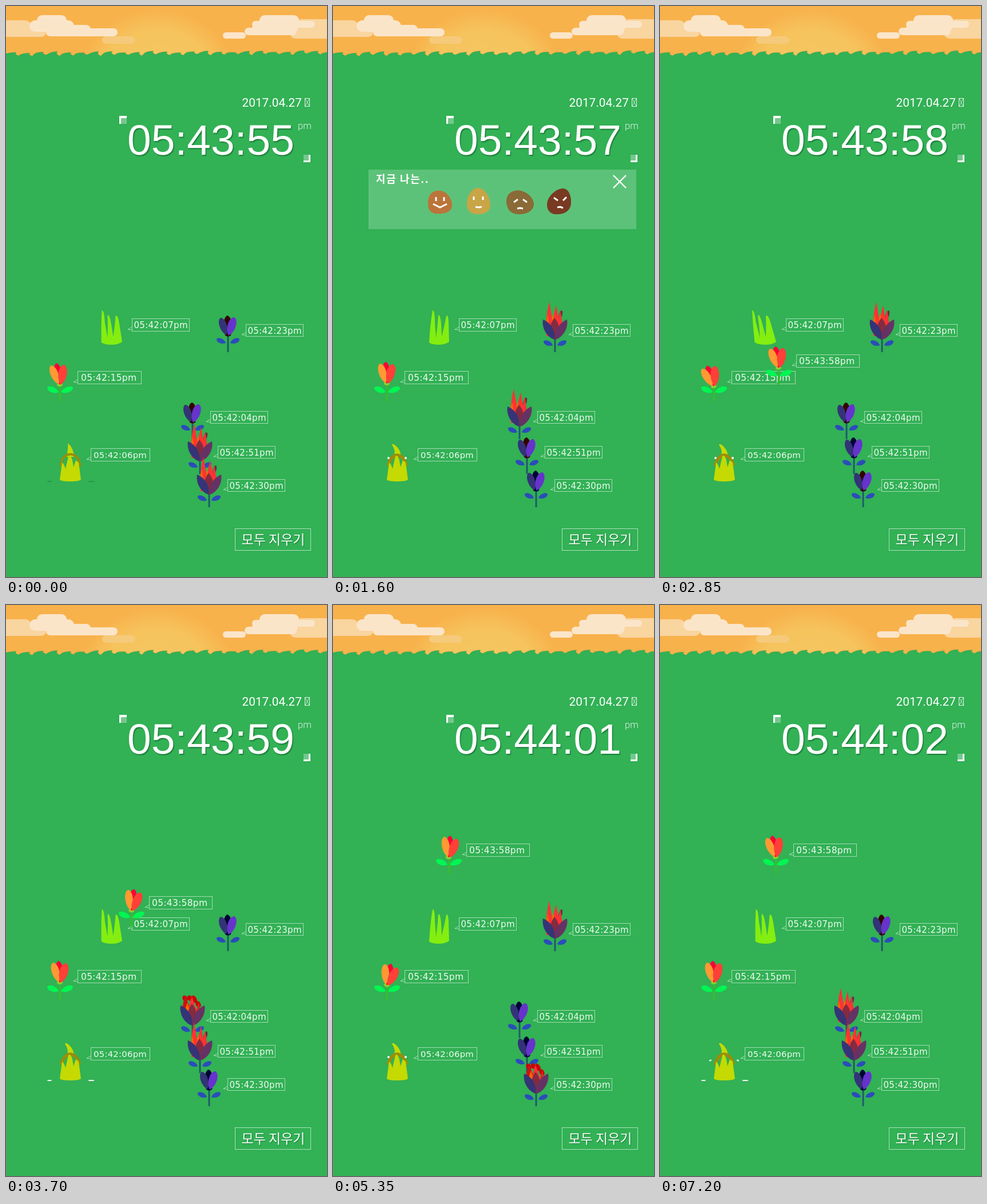
Animation of 561 by 998 pixels, one loop 7.25 s. Source, as an HTML page with a canvas:

```html
<!DOCTYPE html>
<html lang="ko">
<head>
<meta charset="utf-8">
<title>Garden clock</title>
<style>
html, body { margin: 0; width: 100%; height: 100%; overflow: hidden; background: #32b155; }
canvas { display: block; width: 561px; height: 998px; }
</style>
</head>
<body>
<canvas id="stage" width="561" height="998"></canvas>
<script>
const W = 561, H = 998, LOOP = 7250;
const c = document.getElementById('stage').getContext('2d');
const GREEN = '#32b155';
const KR = '"Noto Sans CJK KR", "Noto Sans CJK", sans-serif';

const mod = (a, b) => ((a % b) + b) % b;

// Interpolates rows of [time, value, ...]
function track(keys, t) {
  let i = 0;
  while (i < keys.length - 2 && t >= keys[i + 1][0]) i++;
  const a = keys[i], b = keys[i + 1];
  const k = Math.min(1, Math.max(0, (t - a[0]) / (b[0] - a[0])));
  return a.slice(1).map((v, j) => v + (b[j + 1] - v) * k);
}

function at(x, y, draw) {
  c.save();
  c.translate(x, y);
  draw();
  c.restore();
}

function oval(color, x, y, rx, ry, turn = 0) {
  c.fillStyle = color;
  c.beginPath();
  c.ellipse(x, y, rx, ry, turn, 0, 7);
  c.fill();
}

function pill(color, x, y, w, h) {
  c.fillStyle = color;
  c.beginPath();
  c.roundRect(x, y, w, h, h / 2);
  c.fill();
}

function shape(color, path) {
  c.fillStyle = color;
  c.fill(new Path2D(path));
}

function line(color, width, ...p) {
  c.strokeStyle = color;
  c.lineWidth = width;
  c.beginPath();
  for (let i = 0; i < p.length; i += 2) c.lineTo(p[i], p[i + 1]);
  c.stroke();
}

// Petal from (x, y) to the tip (u, v); a larger full gives a rounder tip
function petal(color, x, y, u, v, w, full = .92) {
  const dx = u - x, dy = v - y, d = Math.hypot(dx, dy);
  const nx = -dy / d * w, ny = dx / d * w;
  c.fillStyle = color;
  c.beginPath();
  c.moveTo(x, y);
  c.bezierCurveTo(x + dx * .25 + nx, y + dy * .25 + ny, x + dx * full + nx, y + dy * full + ny, u, v);
  c.bezierCurveTo(x + dx * full - nx, y + dy * full - ny, x + dx * .25 - nx, y + dy * .25 - ny, x, y);
  c.fill();
}

// Pointed blade with a slight bend
function blade(color, x, y, u, v, w) {
  c.fillStyle = color;
  c.beginPath();
  c.moveTo(x - w, y);
  c.quadraticCurveTo(u - w, (y + v) / 2, u, v);
  c.quadraticCurveTo(u + w * .6, (y + v) / 2, x + w, y);
  c.fill();
}

function text(str, x, y, font, o = {}) {
  c.save();
  c.font = font;
  c.fillStyle = o.color || '#fff';
  c.textAlign = o.align || 'left';
  c.letterSpacing = (o.gap || 0) + 'px';
  if (o.shadow) {
    c.shadowColor = 'rgba(0,60,20,.45)';
    c.shadowOffsetX = c.shadowOffsetY = o.shadow;
    c.shadowBlur = 1.5;
  }
  c.fillText(str, x, y);
  c.restore();
}

function label(str, x, y, w, h, size, inset) {
  const edge = 'rgba(255,255,255,.55)';
  c.strokeStyle = edge;
  c.lineWidth = 1;
  c.strokeRect(x + .5, y + .5, w - 1, h - 1);
  line(edge, 1, x, y + h * .66, x - 7, y + h * .84, x, y + h * .88);
  text(str, x + inset, y + h / 2 + 5.5, size + 'px "DejaVu Sans", sans-serif',
    { gap: .28, color: '#effaf2' });
}

function sky() {
  c.fillStyle = '#f8b24c';
  c.fillRect(0, 0, W, 92);
  const g = c.createRadialGradient(264, 150, 20, 264, 150, 146);
  g.addColorStop(0, '#f5c967');
  g.addColorStop(.7, '#f6c35c');
  g.addColorStop(1, '#f8b24c');
  c.fillStyle = g;
  c.fillRect(100, 0, 330, 92);

  const back = '#f9d5a0', front = '#fbe5c9';
  pill(back, -20, 25, 64, 20);
  pill(back, -20, 37, 90, 17);
  pill(back, 505, 23, 80, 24);
  pill(back, 496, 37, 90, 20);
  pill('#f6ca7b', 168, 53, 58, 13);
  pill(front, 54, 16, 52, 18);
  pill(front, 41, 25, 78, 20);
  pill(front, 83, 33, 65, 16);
  pill(front, 70, 39, 125, 14);
  pill(front, 443, 16, 69, 18);
  pill(front, 430, 26, 110, 12);
  pill(front, 430, 30, 80, 18);
  pill(front, 417, 38, 91, 13);
  pill(front, 379, 46, 40, 11);

  c.fillStyle = GREEN;
  c.strokeStyle = '#dda23d';
  c.lineWidth = 1;
  c.beginPath();
  c.moveTo(-4, 100);
  c.lineTo(-4, 84);
  for (let i = 0; i < 24; i++) {
    const x = i * 24 - 2, dip = 87 + Math.sin(i * 2.3) * 1.2 - i * .12;
    const tip = 81 + Math.sin(i * 1.7) * 1.4 - i * .08;
    c.bezierCurveTo(x + 4, dip - 4, x + 9, tip, x + 20, tip);
    c.quadraticCurveTo(x + 16, dip - 3, x + 24, dip);
  }
  c.lineTo(W + 20, 100);
  c.stroke();
  c.fill();
  c.fillRect(0, 91, W, H);
  c.fillStyle = 'rgba(125,150,125,.65)';
  c.fillRect(0, 90, 1, H);
}

function clock(t) {
  text('2017.04.27', 517, 176, '20.8px Roboto, sans-serif', { align: 'right' });
  c.strokeStyle = '#dff4e5';
  c.lineWidth = 1;
  c.strokeRect(522.5, 161.5, 8, 14);
  line('rgba(255,255,255,.7)', 1, 523, 162, 530, 175);
  line('rgba(255,255,255,.7)', 1, 530, 162, 523, 175);

  const s = 43 * 60 + 55 + Math.floor((t + 700) / 1000);
  const two = n => String(n).padStart(2, '0');
  text('05:' + two(Math.floor(s / 60)) + ':' + two(s % 60), 212, 260,
    '75px "Liberation Sans", Arial, sans-serif', { shadow: 1.5 });
  text('pm', 510, 215, '300 16.5px Roboto, sans-serif', { color: '#e0f4e6' });

  c.fillStyle = '#fff';
  c.fillRect(198, 192, 13, 14);
  c.fillRect(520, 260, 12, 13);
  c.fillStyle = '#74c88d';
  c.fillRect(201, 196, 10, 10);
  c.fillRect(520, 260, 9, 10);
}

function button() {
  c.strokeStyle = 'rgba(255,255,255,.6)';
  c.lineWidth = 1;
  c.strokeRect(400.5, 913.5, 132, 38);
  text('모두 지우기', 467, 941, '300 23px ' + KR, { align: 'center', shadow: 1 });
}

function panel() {
  c.fillStyle = 'rgba(255,255,255,.21)';
  c.fillRect(62, 286, 468, 104);
  text('지금 나는..', 75, 309, 'bold 18px ' + KR, { gap: 1.6 });
  line('#fff', 2.4, 490, 296, 512, 318);
  line('#fff', 2.4, 512, 296, 490, 318);
  const ink = (...p) => line('#fff', 3, ...p);
  at(187, 343, () => {
    shape('#bb743a', 'M-6-20C8-24 22-8 21 6C20 18 8 20-4 20C-16 20-21 14-21 2C-21-10-17-18-6-20Z');
    ink(-7, -9, -7, -2); ink(7, -9, 7, -2); ink(-12, 3, 0, 9, 12, 3);
  });
  at(254, 341, () => {
    shape('#c8a546', 'M0-23C13-22 21-4 21 7C21 19 10 23 0 23C-12 23-20 18-20 5C-20-7-12-24 0-23Z');
    ink(-8, -8, -8, -2); ink(8, -8, 8, -2); ink(-5, 10, 0, 11, 6, 10);
  });
  at(327, 343, () => {
    shape('#8a6a36', 'M-10-20C4-24 23-12 24 3C24 16 10 21-2 21C-16 21-24 12-24-2C-24-12-18-18-10-20Z');
    ink(-11, 0, -4, -5); ink(5, -5, 12, 0); ink(-5, 11, 0, 10, 5, 11);
  });
  at(395, 341, () => {
    shape('#793a22', 'M6-22C18-23 22-6 21 4C20 19 6 24-6 23C-19 22-23 10-20 0C-17-10-6-21 6-22Z');
    ink(-9, -6, -2, -1); ink(7, -1, 13, -7); ink(-3, 11, 2, 10, 7, 12);
  });
}

function tulip(x, y, angle) {
  at(x, y, () => {
    line('#34bd36', 4, 0, -34, 1, -20, 0, -1);
    petal('#00f552', -2, -17, -22, -25, 6.5);
    petal('#00f552', 2, -17, 23, -25, 6.5);
    c.translate(0, -32 + Math.abs(angle) * .32);
    c.rotate(angle * Math.PI / 180);
    oval('#8fd12c', 0, 0, 5, 3);
    petal('#ff0033', 0, 0, -2, -38, 8.5);
    petal('#ff9933', -2, -1, -12, -35, 9);
    petal('#ff4038', 2, 0, 11, -34, 10);
  });
}

function flames(curly) {
  if (curly) {
    for (const [x, y, r] of [[-13, -69, 6], [-5, -70, 5], [3, -68, 7], [10, -59, 6]])
      oval('#c80808', x, y, 4.2, r, -.5);
    blade('#d01010', -6, -36, -12, -74, 9);
    blade('#ff3333', 4, -36, -1, -72, 9);
    blade('#ff6600', -6, -34, -9, -62, 6);
    blade('#e82020', 11, -38, 11, -62, 5);
    return;
  }
  petal('#663040', 6, -54, 12, -73, 4);
  blade('#ff3333', -7, -28, -10, -88, 8);
  blade('#ff3333', 3, -28, 2, -82, 8);
  blade('#ff3333', 10, -36, 9, -74, 5);
  blade('#ff6600', -11, -32, -13, -66, 4);
  blade('#ff6600', -2, -30, -3, -68, 4.5);
}

// spans: burning intervals; beat: start of the dark red pulse
function darkFlower(f, t) {
  const span = f.spans.find(s => t >= s[0] && t < s[1]);
  at(f.x, f.y, () => {
    line('#1c5d68', 3, 0, -30, 0, 0);
    const low = span ? 4 : 0;
    petal('#2b4cba', -4, -16 + low, -20, -23 + low, 5.5);
    petal('#2b4cba', 4, -16 + low, 20, -23 + low, 5.5);
    if (span) {
      flames(t - span[0] < 260 || span[1] - t < 100);
      petal('#852b40', 0, -22, -1, -60, 10, .7);
      petal('#353477', -1, -22, -21, -57, 9.5, .72);
      petal('#663264', 1, -22, 21, -57, 9.5, .72);
      return;
    }
    const red = mod(t - f.beat, 300) < 160;
    const core = red ? '#330000' : '#000033';
    oval(core, 0, -31, 5.5, 3.5);
    petal(core, 0, -28, -1, -64, 9);
    petal('#333377', -3, -30, -13, -60, 8.5);
    petal('#6633cc', 1, -29, 11, -61, 9.5);
  });
}

function grass(lean) {
  const k = lean * 6.5;
  shape('#84ee10', `M${168 - k * .2} 588Q${170 - k * .6} 555 ${174 - k} 532Q${178 - k} 531 ${178 - k * .8} 553
    L${180 - k * .4} 580Q${183 - k * .7} 560 ${184 - k} 541Q${187 - k} 537 ${189 - k * .8} 555
    L${190 - k * .4} 578Q${195 - k * .7} 558 ${198 - k} 542Q${201 - k} 538 ${202 - k * .7} 552
    L203 587Q196 592 185 592Q172 592 ${168 - k * .2} 588Z`);
}

function sprout(t) {
  const p = mod(t - 1600, 1250), alt = p > 870 && p < 1100;
  const body = '#c4da02', arm = '#9c8d08';
  shape(body, alt
    ? 'M106 788Q109 772 108 764Q118 772 119 788Z'
    : 'M106 788Q111 778 103 767Q104 764 109 768Q118 775 119 788Z');
  c.lineCap = 'round';
  c.strokeStyle = arm;
  c.lineWidth = alt ? 4 : 5.5;
  c.stroke(new Path2D(alt
    ? 'M96 803C97 777 128 777 129 803'
    : 'M97 801Q102 786 112 785Q123 786 128 801'));
  c.lineCap = 'butt';
  shape(body, `M94 828L98 798Q102 801 104 809L109 787Q113 783 116 794L118 806
    L122 794Q125 796 127 798L131 828Q127 831 112 831Q97 831 94 828Z`);
  if (p < 350) {
    oval('#fff', 97, 790, 2, 2);
    oval('#fff', 127, 790, 2, 2);
  } else if (p > 570 && p < 760) {
    const d = (p - 600) / 15;
    oval('#e8f8ec', 88 - d, 796 + d, 2.2, 1.5, -.5);
    oval('#e8f8ec', 136 + d, 796 + d, 2.2, 1.5, .5);
  }
  const dash = p > 870 && p < 960 ? '#28934a'
    : p >= 500 && p < 580 ? 'rgba(255,255,255,.4)'
    : p >= 580 && p <= 870 ? '#fff' : '';
  if (dash) {
    oval(dash, 76, 831, 4, 1.1);
    oval(dash, 149, 831, 5.5, 1.1);
  }
}

const darks = [
  { x: 388, y: 605, beat: 230, spans: [[1150, 3200], [4850, 6400]], tag: [419, 556, '23'] },
  { x: 326, y: 757, beat: 295, spans: [[1150, 2500], [3500, 5050], [6700, 8000]], tag: [357, 708, '04'] },
  { x: 339, y: 818, beat: 280, spans: [[-500, 1100], [3250, 4710], [6500, 8000]], tag: [370, 769, '51'] },
  { x: 355, y: 876, beat: 120, spans: [[-500, 900], [5200, 6600]], tag: [387, 827, '30'] }
];
const sway1 = [[0, -6], [350, -14], [1000, 8], [1600, 0], [2200, 12], [2850, -15], [3700, 0],
  [4150, -11], [4650, 0], [5350, 14], [6000, 0], [6600, -12], [7200, 0]];
const sway2 = [[2350, 0], [2850, -5], [3700, 10], [4150, -8], [4650, 5], [5000, 13], [5350, 7],
  [6000, -12], [6600, 10], [7200, -6]];
const bend = [[0, 1], [500, 2], [1100, 0], [1600, 0], [2200, 1], [2850, 2], [3700, 1], [4250, 2],
  [4650, 0], [5350, 0], [6100, 2], [6700, 0], [7200, 1]];
const drag = [[2350, 238, 609], [2900, 238, 609], [3700, 250, 509], [4300, 257, 415],
  [4700, 257, 415], [5300, 233, 417], [7250, 233, 417]];

function draw(t) {
  sky();
  clock(t);
  button();
  grass(track(bend, t)[0]);
  label('05:42:07pm', 220, 546, 101, 23, 15, 3.5);
  tulip(94, 692, track(sway1, t)[0]);
  label('05:42:15pm', 125, 638, 112, 23, 15.5, 6);
  sprout(t);
  label('05:42:06pm', 148, 773, 104, 23, 14.8, 5);
  for (const f of darks) {
    darkFlower(f, t);
    label('05:42:' + f.tag[2] + 'pm', f.tag[0], f.tag[1], 101, 22, 15, 3.5);
  }
  if (t >= 1100 && t < 2350) panel();
  if (t >= 2350) {
    const [x, y] = track(drag, t).map(Math.round);
    label('05:43:58pm', x, y, 111, 23, 15.5, 5);
    tulip(x - 31, y + 54, track(sway2, t)[0]);
  }
}

const start = performance.now();
function tick() {
  const t = mod(performance.now() - start, LOOP);
  draw(Math.floor(t / 50) * 50);
  requestAnimationFrame(tick);
}
tick();
</script>
</body>
</html>
```
